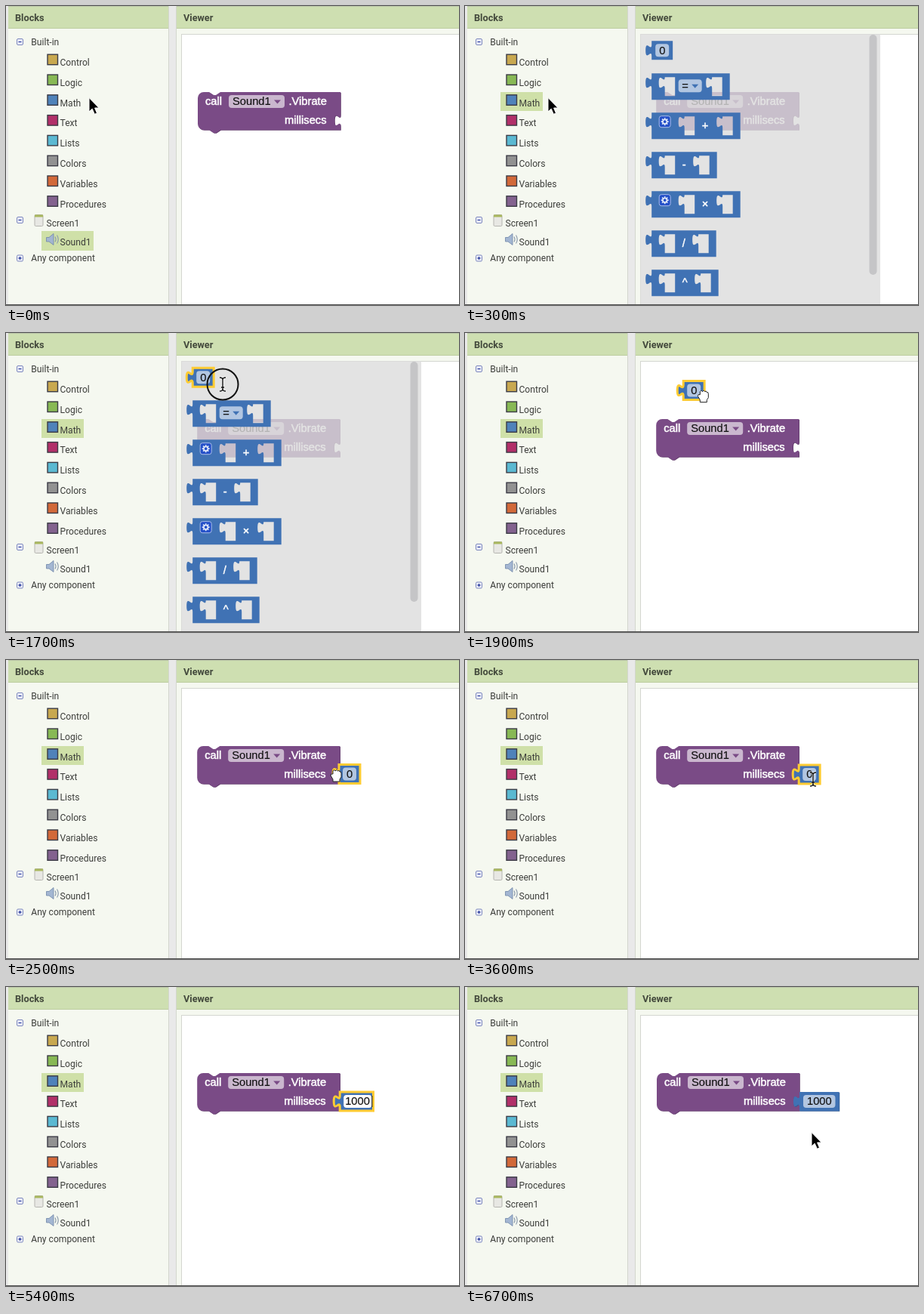
These frames come from a looping animation (600x396 px, 6800 ms). An HTML page:

```html
<!DOCTYPE html>
<html lang="en">
<head>
<meta charset="utf-8">
<title>Block editor</title>
<style>
  html, body { margin: 0; width: 100%; height: 100%; overflow: hidden; background: #fff; }
  svg { display: block; width: 600px; height: 396px; }
  text { white-space: pre; }
  .ui { font: 12.1px Roboto, sans-serif; fill: #3c3d3a; }
  .head { font: bold 12.7px Roboto, sans-serif; fill: #43493c; }
  .label, .value { font: 14.7px "Liberation Sans", Arial, sans-serif; }
  .label { fill: #fff; stroke: #fff; stroke-width: .5; }
  .value { fill: #111; stroke: #111; stroke-width: .15; }
  .field { fill: #fff; fill-opacity: .6; }
  .math { fill: #4072b4; }
  .math-dark { fill: #335c94; }
  .call { fill: #7a4b86; }
  .call-dark { fill: #633c6d; }
  .mark { fill: #cfe0a8; }
</style>
</head>
<body>
<svg viewBox="0 0 600 396">
  <g id="panels"></g>
  <g id="workspace">
    <g id="call"></g>
    <g id="flyout"></g>
    <g id="number">
      <path id="numberDark" class="math-dark" transform="translate(.8 .8)"/>
      <path id="numberBody" class="math"/>
      <rect id="numberField" x="5" y="4" height="17" rx="4"/>
      <rect id="selection" x="7" y="5" width="9" height="15" fill="#b4d5fe"/>
      <text id="numberText" class="value" y="17.3"></text>
      <path id="caret" stroke="#111"/>
    </g>
  </g>
  <g id="pointer">
    <circle id="ring" r="20.5" fill="none" stroke="#111" stroke-width="2"/>
    <path id="arrow" d="M0-.5V18L4.2 14.200 7.4 21.300 10.500 20 7.600 13H13.200Z" fill="#000" stroke="#fff"/>
    <g id="beam" fill="none">
      <path d="M-4-9Q0-9 0-6Q0-9 4-9M0-7V7M-4 9Q0 9 0 6Q0 9 4 9M-2 4H2" stroke="#fff" stroke-width="3" opacity=".7"/>
      <path d="M-4-9Q0-9 0-6Q0-9 4-9M0-7V7M-4 9Q0 9 0 6Q0 9 4 9M-2 4H2" stroke="#111" stroke-width="1.4"/>
    </g>
    <path id="hand" d="M-4 9V6L-7 1Q-7-2-4-1V-5Q-2.5-8-1-5Q1-8 2.5-5Q4-7 5-4Q7-5 7-2V3L5 6V9Z" fill="#fff" stroke="#222"/>
  </g>
</svg>
<script>
const $ = id => document.getElementById(id);
const LOOP = 6800;
const STEP = 100;
const DIGIT = 8.17;

const rect = (x, y, w, h, fill, extra = '') =>
  `<rect x="${x}" y="${y}" width="${w}" height="${h}" fill="${fill}" ${extra}/>`;
const text = (x, y, cls, str) => `<text x="${x}" y="${y}" class="${cls}">${str}</text>`;
const triangle = (x, y, cls) => `<path class="${cls}" d="M${x} ${y}h9l-4.5 5z"/>`;

// Puzzle-tab edges, 15 px high
const TAB_DOWN = 'c0 10-8-8-8 7.5s8-2.5 8 7.5';
const TAB_UP = 'c0-10-8 8-8-7.5s8 2.5 8-7.5';
const outputBlock = (w, h) => `M0 0H${w}V${h}H0V20${TAB_UP}Z`;
const socket = x => `M${x + 8} 5H${x + 21.5}V30H${x + 8}V20${TAB_UP}Z`;

function toggle(y, plus) {
  return rect(14.5, y - 3.5, 8, 8, '#eef0fa', 'stroke="#7c87bd" rx="1.5"') +
    `<path d="M16.5 ${y + .5}h4${plus ? `M18.5 ${y - 1.5}v4` : ''}" stroke="#3344a0" stroke-width="1.3"/>`;
}

function drawPanels() {
  const drawers = [
    ['Control', '#c8a850'], ['Logic', '#88b955'], ['Math', '#4f82ba'], ['Text', '#b23069'],
    ['Lists', '#5bb9d2'], ['Colors', '#929292'], ['Variables', '#d2693a'], ['Procedures', '#83628f']
  ];
  const panel = (x, w, title) =>
    rect(x, 0, w, 396, '#f5f8f0') + rect(x, 0, w, 30, '#cedfb1') +
    rect(x, 0, w, 1, '#b9c4a6') + rect(x, 29, w, 1, '#bccda0') + text(x + 9, 20, 'head', title);

  $('panels').innerHTML =
    rect(0, 0, 600, 396, '#e9e9e9') +
    panel(3, 213, 'Blocks') + panel(226, 374, 'Viewer') +
    rect(215, 0, 1, 396, '#d3d6cd') + rect(225, 0, 1, 396, '#d3d6cd') +
    rect(232.5, 37.5, 380, 370, '#fff', 'stroke="#d4d6d0"') +
    rect(47, 114, 56, 25, '', 'class="mark" id="mathMark"') +
    rect(47, 298, 69, 26, '', 'class="mark" id="soundMark"') +
    toggle(47, false) + text(33.3, 52, 'ui', 'Built-in') +
    drawers.map(([name, color], i) =>
      rect(55, 64.2 + 26.8 * i, 13.5, 13.5, color, 'stroke="#3b3b45" stroke-width="1.4"') +
      text(71.5, 79 + 26.8 * i, 'ui', name)).join('') +
    toggle(283, false) +
    rect(38, 276.5, 11, 15, '#e8e8e4', 'stroke="#b5b5b0" rx="1.5"') + rect(38, 276.5, 11, 3, '#a9b85f') +
    text(53.5, 291.5, 'ui', 'Screen1') +
    '<path d="M53.500 306.500h3.500l6-5v15l-6-4.500h-3.500z" fill="#a3b6d2" stroke="#6f86a8" stroke-width=".8"/>' +
    '<path d="M65 305.500q2 3.500 0 7M67.500 303.500q3.500 5.500 0 11" fill="none" stroke="#8f9dae" stroke-width="1.2"/>' +
    text(71.5, 317, 'ui', 'Sound1') +
    toggle(333.5, true) + text(33.3, 338, 'ui', 'Any component') +
    rect(0, 395, 600, 1, '#555');
}

function drawCall() {
  const shape = 'M254 122a8 8 0 0 1 8-8H269l6 4h3l6-4H443V144' + TAB_DOWN +
    'V164H284l-6 4h-3l-6-4H262a8 8 0 0 1-8-8Z';
  $('call').innerHTML =
    `<path class="call-dark" d="${shape}" transform="translate(.8 .8)"/><path class="call" d="${shape}"/>` +
    rect(295, 118, 74, 17, '', 'class="field" rx="4"') +
    text(264, 131.2, 'label', 'call') + text(300, 131.2, 'value', 'Sound1') +
    triangle(355, 124.5, 'call') +
    text(374.5, 131.2, 'label', '.Vibrate') + text(369, 156.2, 'label', 'millisecs');
}

function gear() {
  const teeth = [0, 45, 90, 135].map(a =>
    `<path d="M0-5V5" transform="rotate(${a})" stroke="#e3eafa" stroke-width="1.8"/>`).join('');
  return rect(10, 4.5, 15, 15, '#2450c8', 'stroke="#a9bce8" rx="3"') +
    `<g transform="translate(17.5 12)">${teeth}<circle r="2.700" fill="#2450c8" stroke="#e3eafa" stroke-width="1.600"/></g>`;
}

function drawFlyout() {
  const operators = [['=', 103.5], ['+', 117.5], ['-', 86.5], ['×', 117.5], ['/', 85.5], ['^', 88.5]];
  const blocks = operators.map(([sign, w], i) => {
    const mutable = sign === '+' || sign === '×';
    const first = mutable ? 35.5 : 9.5;
    const d = outputBlock(w, 35) + socket(first) + socket(w - 31.5);
    const middle = sign === '='
      ? rect(35.5, 8, 31, 17, '', 'class="field" rx="4"') + text(40, 21.5, 'value', '=') + triangle(53, 14.5, 'math')
      : text(first + 31, 22, 'label', sign);
    return `<g transform="translate(248 ${89.2 + 52 * i})">
      <path class="math" fill-rule="evenodd" d="${d}"/>${middle}${mutable ? gear() : ''}</g>`;
  });
  $('flyout').innerHTML =
    rect(232.8, 37, 318, 358, '#ddd', 'fill-opacity=".8"') +
    rect(536.3, 38, 10, 318, '#c5c5c7', 'rx="5"') + blocks.join('');
}

// Rows of [time, x, y], joined by straight moves
const pointerPath = [
  [0, 110, 122], [800, 110, 122], [1500, 287, 68], [1800, 287, 68], [2100, 372, 112],
  [2400, 437, 152], [2800, 437, 152], [3400, 461, 158], [5600, 461, 158], [6000, 459, 193], [LOOP, 459, 193]
];
const numberPath = [
  [0, 248, 46.3], [1800, 248, 46.3], [2100, 374, 98], [2400, 441.8, 138.5], [2700, 441.8, 138.5],
  [2800, 443, 139], [LOOP, 443, 139]
];
const pointerKinds = [[1400, 'arrow'], [1900, 'beam'], [2800, 'hand'], [4500, 'beam'], [5700, ''], [LOOP, 'arrow']];
const typing = [[4500, '0'], [4800, '1'], [5000, '10'], [5200, '100'], [LOOP, '1000']];
const clicks = [[100, 200], [1600, 1800], [3700, 3800], [6200, 6400]];

const during = (t, from, to) => t >= from && t < to;
const pick = (rows, t) => rows.find(([end]) => t < end)[1];
const show = (id, on) => $(id).setAttribute('display', on ? 'inline' : 'none');
const set = (id, attrs) => Object.entries(attrs).forEach(([k, v]) => $(id).setAttribute(k, v));

function along(path, t) {
  const i = path.findIndex(([time]) => t < time);
  const [t0, x0, y0] = path[i - 1], [t1, x1, y1] = path[i];
  const k = (t - t0) / (t1 - t0);
  return `translate(${x0 + (x1 - x0) * k} ${y0 + (y1 - y0) * k})`;
}

function drawNumber(t) {
  const editing = during(t, 3800, 5600);
  const selected = during(t, 1600, 6400);
  const value = pick(typing, t);
  // While typing, the block is sized for one digit fewer
  const digits = editing ? Math.max(1, value.length - 1) : value.length;
  const width = 19.8 + DIGIT * digits;
  const shape = outputBlock(width, 25);

  show('number', t >= 200);
  set('number', { transform: along(numberPath, t) });
  show('numberDark', t >= 6400);
  set('numberDark', { d: shape });
  set('numberBody', { d: shape, stroke: selected ? '#fc3' : 'none', 'stroke-width': 3 });
  set('numberField', { width: width - (editing ? 7 : 10), fill: '#fff', 'fill-opacity': editing ? 1 : .6 });
  set('numberText', { x: editing ? 7 : 10 });
  $('numberText').textContent = value;
  show('selection', editing && t < 4500);
  show('caret', editing && t >= 4500);
  set('caret', { d: `M${8 + DIGIT * value.length + 2} 5V20` });
}

function draw(t) {
  show('mathMark', t >= 200);
  show('soundMark', t < 200);
  show('flyout', during(t, 200, 1900));
  set('workspace', { transform: `translate(${during(t, 200, 6400) ? -.8 : 0} 0)` });
  drawNumber(t);

  const kind = pick(pointerKinds, t);
  set('pointer', { transform: along(pointerPath, t) });
  for (const id of ['arrow', 'beam', 'hand']) show(id, id === kind);
  show('ring', clicks.some(([from, to]) => during(t, from, to)));
}

function tick() {
  draw(Math.floor(performance.now() % LOOP / STEP) * STEP);
  requestAnimationFrame(tick);
}

drawPanels();
drawCall();
drawFlyout();
tick();
</script>
</body>
</html>
```
